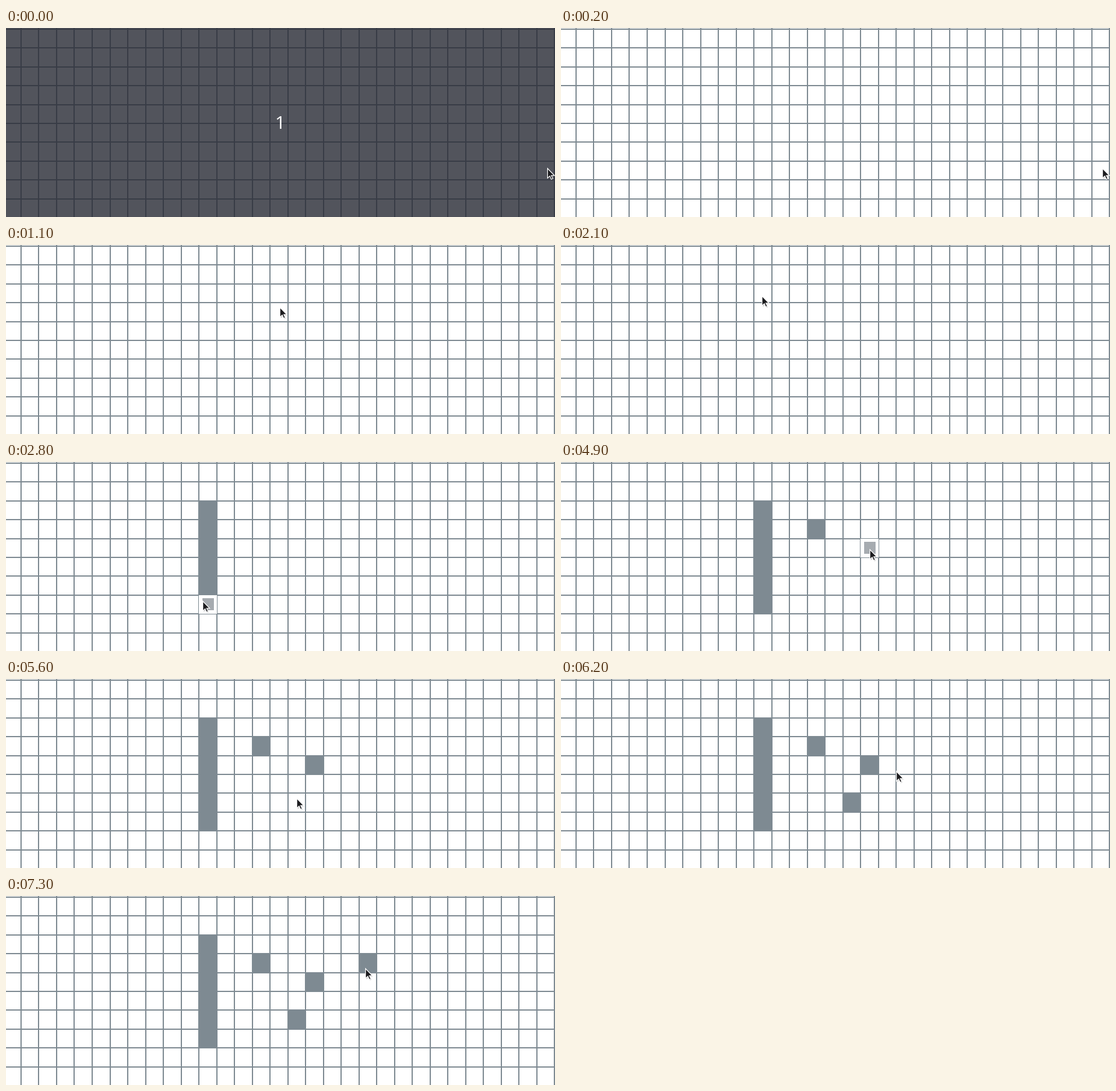
Write an HTML page that moves like this. It is 911 px wide and 315 px high and loops after 9300 ms.

```html
<!DOCTYPE html>
<html lang="en">
<head>
<meta charset="utf-8">
<title>Drawing walls on a grid</title>
<style>
  html, body { margin: 0; width: 911px; height: 315px; overflow: hidden; background: #fff; }
  svg { display: block; }
  .line, .wall { fill: #7e8a92; }
  .wall.new { fill: #fff; }
  .mark { fill: #a6abb0; }
  .shade { fill: rgba(39, 42, 52, .8); }
  .count { fill: #fff; font: 30px "Open Sans", "Noto Sans", sans-serif; text-anchor: middle; }
  .shadow { fill: rgba(0, 0, 0, .18); }
  .arrow { fill: #1b1b1e; stroke: #fff; stroke-width: 1.2; }
</style>
</head>
<body>
<svg width="911" height="315" viewBox="0 0 911 315">
  <g id="grid" shape-rendering="crispEdges"></g>
  <g id="walls" shape-rendering="crispEdges"></g>
  <g id="intro">
    <rect class="shade" width="911" height="315"/>
    <text class="count" x="455" y="168">1</text>
  </g>
  <g id="cursor">
    <path class="shadow" d="M1 2V17L4.7 13.7L7 18.6L9.6 17.5L7.4 12.6H12Z"/>
    <path class="arrow" d="M-.4 -.9V15.2L3.4 11.8L5.8 17.2L8.4 16L6 10.9H11Z"/>
  </g>
</svg>
<script>
const LOOP = 9300, INTRO = 200, STEP = 100;
const LEFT = 24.96, TOP = 2, CELL_W = 29.51, CELL_H = 31.4;
const colX = c => Math.round(LEFT + CELL_W * c);
const rowY = r => Math.round(TOP + CELL_H * r);
const byId = id => document.getElementById(id);
const ease = p => (1 - Math.cos(Math.PI * p)) / 2;

// Pointer strokes: first step, last step, and where they end
const home = { x: 899, y: 235 };
const strokes = [
  { from: 600, to: 900, x: 472, y: 106 },
  { from: 1100, to: 1400, x: 358, y: 97 },
  { from: 1600, to: 1800, x: 333, y: 91 },
  { from: 2100, to: 2100, x: 334, y: 86 },
  { from: 2200, to: 2900, x: 327, y: 239 },
  { from: 3200, to: 3600, x: 432, y: 119 },
  { from: 3800, to: 3900, x: 431, y: 113 },
  { from: 4300, to: 4600, x: 513, y: 147 },
  { from: 5300, to: 5700, x: 480, y: 206 },
  { from: 6200, to: 6200, x: 557, y: 155 },
  { from: 6300, to: 6500, x: 597, y: 124 },
  { from: 7200, to: 7300, x: 597, y: 122 }
];

function pointerAt(t) {
  const time = Math.floor(t / STEP) * STEP;
  let { x, y } = home;
  for (const s of strokes) {
    if (time < s.from) break;
    const p = ease(Math.min(1, (time - s.from + STEP) / (s.to - s.from + STEP)));
    x += (s.x - x) * p;
    y += (s.y - y) * p;
  }
  return { x, y };
}

function addRect(parent, name, x, y, width, height) {
  const el = document.createElementNS(parent.namespaceURI, "rect");
  el.setAttribute("class", name);
  place(el, x, y, width, height);
  return parent.appendChild(el);
}

function place(el, x, y, width, height) {
  Object.entries({ x, y, width, height }).forEach(([k, v]) => el.setAttribute(k, v));
}

for (let c = 0; c <= 30; c++) addRect(byId("grid"), "line", colX(c) - 1, 0, 2, 315);
for (let r = 0; r < 10; r++) addRect(byId("grid"), "line", 0, rowY(r) - 1, 911, 2);

// A press turns the cell under the pointer into a wall
const walls = [];
function press(time) {
  const { x, y } = pointerAt(time);
  const c = Math.floor((x - LEFT) / CELL_W), r = Math.floor((y - TOP) / CELL_H);
  if (walls.some(w => w.c === c && w.r === r)) return;
  const wall = addRect(byId("walls"), "wall", 0, 0, 0, 0);
  const mark = addRect(byId("walls"), "mark", colX(c) + 6, rowY(r) + 5, 19, 20);
  walls.push({ time, c, r, wall, mark });
}
for (let t = 2200; t <= 2900; t += STEP) press(t);
for (let t = 4000; t <= 6700; t += 900) press(t);

function drawWall({ time, c, r, wall, mark }, t) {
  const isNew = t < time + STEP, edge = isNew ? 0 : 1;
  const x = colX(c), y = rowY(r);
  wall.style.display = t < time ? "none" : "";
  mark.style.display = t >= time && isNew ? "" : "none";
  wall.classList.toggle("new", isNew);
  place(wall, x - edge, y - edge, colX(c + 1) - x + 2 * edge, rowY(r + 1) - y + 2 * edge);
}

function draw(now) {
  const t = now % LOOP, { x, y } = pointerAt(t);
  byId("intro").style.display = t < INTRO ? "" : "none";
  byId("cursor").setAttribute("transform", `translate(${Math.round(x)} ${Math.round(y)})`);
  walls.forEach(w => drawWall(w, t));
}

const start = performance.now();
function tick() {
  draw(performance.now() - start);
  requestAnimationFrame(tick);
}
tick();
</script>
</body>
</html>
```
